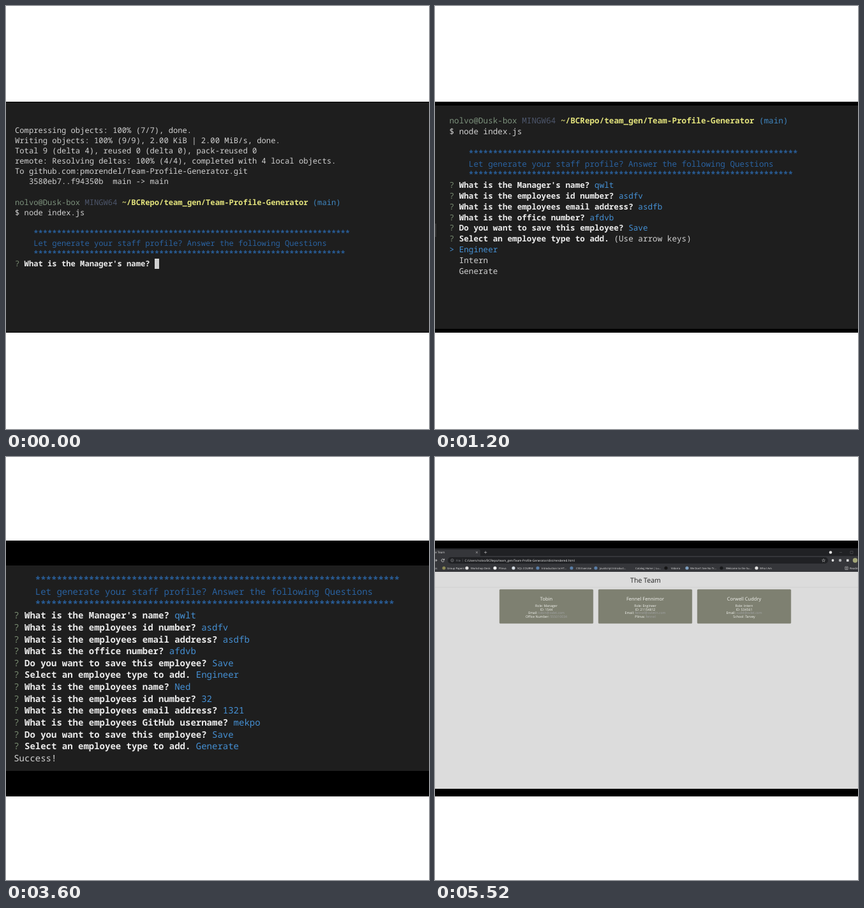
An HTML page for the animation above (6 s loop, 663x663 px).

```html
<!DOCTYPE html>
<html lang="en">
<head>
<meta charset="utf-8">
<title>Team profile generator</title>
<style>
  html, body { margin: 0; width: 100%; height: 100%; overflow: hidden; background: #fff; }
  svg { display: block; width: 100vw; height: 100vh; }
  text { white-space: pre; text-rendering: geometricPrecision; }
  .term { font-family: "Noto Sans Mono", "DejaVu Sans Mono", monospace; }
  .ui { font-family: "Open Sans", "Noto Sans", sans-serif; }
</style>
</head>
<body>
<svg id="stage" viewBox="0 0 663 663"></svg>
<script>
const HOLD = 1200;
const C = { text: '#d0d0d0', bold: '#ececec', ask: '#788a70', user: '#7c917c', sys: '#4d566b',
  path: '#e3e37c', branch: '#3f86c0', banner: '#2a62a0', answer: '#4590d4', panel: '#1e1e1e' };

const esc = s => s.replace(/&/g, '&amp;').replace(/</g, '&lt;').replace(/>/g, '&gt;');
const rect = (x, y, w, h, fill, extra = '') =>
  `<rect x="${x}" y="${y}" width="${w}" height="${h}" fill="${fill}" ${extra}/>`;
const dot = (x, y, r, fill) => `<circle cx="${x}" cy="${y}" r="${r}" fill="${fill}"/>`;
const line = (d, color, w = .8) => `<path d="${d}" fill="none" stroke="${color}" stroke-width="${w}"/>`;

// Terminal rows are lists of [colour, text, bold]
const plain = s => [[C.text, s]];
const blank = [];
const prompt = [[C.user, 'nolvo@Dusk-box '], [C.sys, 'MINGW64 '],
  [C.path, '~/BCRepo/team_gen/Team-Profile-Generator ', true], [C.branch, '(main)']];
const command = plain('$ node index.js');
const stars = n => [[C.banner, '    ' + '*'.repeat(n), true]];
const banner = [stars(68),
  [[C.banner, '    Let generate your staff profile? Answer the following Questions']], stars(67)];
const ask = (question, reply = '', color = C.answer) =>
  [[C.ask, '? '], [C.bold, question + ' ', true], [color, reply]];
const pick = (reply, color) => ask('Select an employee type to add.', reply, color);
const save = ask('Do you want to save this employee?', 'Save');
const id = n => ask('What is the employees id number?', n);
const email = s => ask('What is the employees email address?', s);
const manager = [ask("What is the Manager's name?", 'qwlt'), id('asdfv'), email('asdfb'),
  ask('What is the office number?', 'afdvb'), save];
const engineer = [pick('Engineer'), ask('What is the employees name?', 'Ned'), id('32'), email('1321'),
  ask('What is the employees GitHub username?', 'mekpo'), save];
const menu = [pick('(Use arrow keys)', C.text), [[C.answer, '> Engineer']], plain('  Intern'), plain('  Generate')];

// y is the middle of the first row, cell the width of one character
function terminal(x, y, cell, pitch, rows) {
  const size = cell / 0.6;
  return rows.map((row, i) =>
    `<text class="term" x="${x}" y="${y + i * pitch + size * .34}" font-size="${size}">` +
    row.map(([color, s, bold]) =>
      `<tspan fill="${color}" font-weight="${bold ? 700 : 400}">${esc(s)}</tspan>`).join('') +
    '</text>').join('');
}

const start = rect(0, 150, 663, 362, '#000') + rect(0, 151, 663, 360, C.panel) +
  terminal(14, 194.4, 7.3, 16.15, [
    ...['Compressing objects: 100% (7/7), done.',
      'Writing objects: 100% (9/9), 2.00 KiB | 2.00 MiB/s, done.',
      'Total 9 (delta 4), reused 0 (delta 0), pack-reused 0',
      'remote: Resolving deltas: 100% (4/4), completed with 4 local objects.',
      'To github.com:pmorendel/Team-Profile-Generator.git',
      '   3580eb7..f94350b  main -> main'].map(plain),
    blank, prompt, command, blank, ...banner, ask("What is the Manager's name?")]) +
  rect(233, 396, 7, 16, '#d0d0d0');

const firstMenu = rect(0, 150, 663, 362, '#000') + rect(0, 156, 663, 350, C.panel) +
  rect(0, 341, 2, 21, '#363636') +
  terminal(22.5, 180, 7.59, 16.8, [prompt, command, blank, ...banner, ...manager, ...menu]);

const secondMenu = rect(0, 131, 663, 401, C.panel) +
  terminal(9, 158.2, 7.78, 17.24, [...banner, ...manager, ...engineer, ...menu]);

const success = rect(0, 131, 663, 401, '#000') + rect(0, 170, 663, 322, C.panel) +
  terminal(12.2, 192.6, 8.41, 18.63,
    [...banner, ...manager, ...engineer, pick('Generate'), plain('Success!')]);

const label = (x, y, s, size, fill, extra = '') =>
  `<text class="ui" x="${x}" y="${y + size * .36}" font-size="${size}" fill="${fill}" ${extra}>${esc(s)}</text>`;
const centred = (x, y, s, size, fill) =>
  label(x, y, s, size, fill, 'text-anchor="middle"');

function card(x, name, rows) {
  const mid = x + 73.5;
  return rect(x + .25, 207.75, 146.5, 53, '#7e8071', 'rx="1" stroke="#717365" stroke-width=".5"') +
    centred(mid, 222, name, 7.5, '#f4f4f0') +
    rows.map(([key, value, link]) =>
      `<tspan fill="#f4f4f0">${key}: </tspan><tspan fill="${link ? '#a3a4a6' : '#f4f4f0'}">${value}</tspan>`)
      .map((s, i) => `<text class="ui" x="${mid}" y="${235 + i * 5.5}" font-size="5.2" text-anchor="middle">${s}</text>`)
      .join('');
}

// [icon x, icon colour, text x, text]
const bookmarks = [
  [14, '#8c8a55', 19, 'Group Papers'], [50, '#e0e0e0', 56, 'Workshop Desk'], [94, '#f0f0f0', 100, 'Plinva'],
  [123, '#d5dce2', 129, 'SQL COURSE'], [161, '#5a7fa8', 167, 'Introduction to HT...'],
  [214, '#5a7fa8', 221, 'CSS Exercise'], [252, '#5a7fa8', 258, 'JavaScript Introduct...'],
  [0, '', 314, 'Catalog Home | Lu...'], [362, '#151515', 370, 'Vidorra'], [395, '#7d9fc0', 400, "We Don't See No Tr..."],
  [449, '#17181a', 456, 'Welcome to the Su...'], [504, '#e0e0e0', 509, 'Who I Am']];

const browser = rect(0, 131, 663, 401, '#000') +
  rect(0, 143, 663, 12, '#202124') + rect(-4, 145, 75, 12, '#35363a', 'rx="2"') +
  rect(0, 155, 663, 25, '#35363a') + rect(20, 157, 596, 10, '#202124', 'rx="5"') +
  label(-2.5, 149.5, 'he Team', 4.5, '#e0e0e0') +
  line('M64 148l3 3m0-3l-3 3M77 149.5h4.4m-2.2-2.2v4.4', '#c8c8c8', .6) +
  dot(620, 149.5, 2.3, '#e0e0e0') + line('M634 149.5h4M651 147.5h4v4h-4z', '#55575a', .6) +
  line('M0 162h3m-1.6-1.8l1.8 1.8l-1.8 1.8', '#dcdcdc') +
  line('M14.2 161.2a2.2 2.2 0 1 0 0 1.8M14.6 159.4v2h-2', '#dcdcdc') +
  line('M29.2 162a2.2 2.2 0 1 0-4.4 0a2.2 2.2 0 1 0 4.4 0M27 161.5v1.6', '#9a9ca0', .6) +
  label(33, 162, 'File', 4.5, '#8d9094') + line('M43.2 159.5v5', '#6b6d70', .5) +
  label(46.5, 162, 'C:/Users/nolvo/BCRepo/team_gen/Team-Profile-Generator/dist/rendered.html', 4.75, '#ececec') +
  line('M609 159.5l.7 1.8h1.8l-1.4 1.2l.5 1.8l-1.6-1l-1.6 1l.5-1.8l-1.4-1.2h1.8z', '#c8c8c8', .5) +
  dot(623.5, 162, 1.9, '#e4e4e4') + dot(635, 162, 2.2, '#b0b2b4') +
  rect(645, 160.3, 3.6, 3.6, '#e0e0e0') + dot(658.5, 162, 3.7, '#a4a877') +
  label(-1, 174, 'ps', 4.2, '#e0e0e0') +
  bookmarks.map(([x, color, tx, s]) =>
    (color ? dot(x, 174, 2.6, color) : '') + label(tx, 174, s, 4.2, '#e4e4e4')).join('') +
  line('M642.8 172h4.4v4.4h-4.4zM644 173.6h2M644 175h2', '#c8c8c8', .6) +
  label(650, 174, 'Reading list', 4.2, '#e4e4e4') +
  rect(0, 180, 663, 340, '#dcdcdc') + rect(0, 203.8, 663, .7, '#cdcdcd') +
  centred(330, 193.5, 'The Team', 10.6, '#222') +
  card(101, 'Tobin', [['Role', 'Manager'], ['ID', '1544'], ['Email', 'tobin@ovlet.com', 1],
    ['Office Number', '555010034', 1]]) +
  card(256, 'Fennel Fennimor', [['Role', 'Engineer'], ['ID', '21154812'], ['Email', 'fennel@ovletin.com', 1],
    ['Plinva', 'fennel', 1]]) +
  card(411, 'Corwell Cuddry', [['Role', 'Intern'], ['ID', '534561'], ['Email', 'cudd@ovlet.com', 1],
    ['School', 'Tarvey']]);

const stage = document.getElementById('stage');
stage.innerHTML = [start, firstMenu, secondMenu, success, browser].map(s => `<g>${s}</g>`).join('');
const scenes = [...stage.children];

function draw() {
  const current = Math.floor(performance.now() / HOLD) % scenes.length;
  scenes.forEach((g, i) => g.style.display = i === current ? '' : 'none');
  requestAnimationFrame(draw);
}
draw();
</script>
</body>
</html>
```
